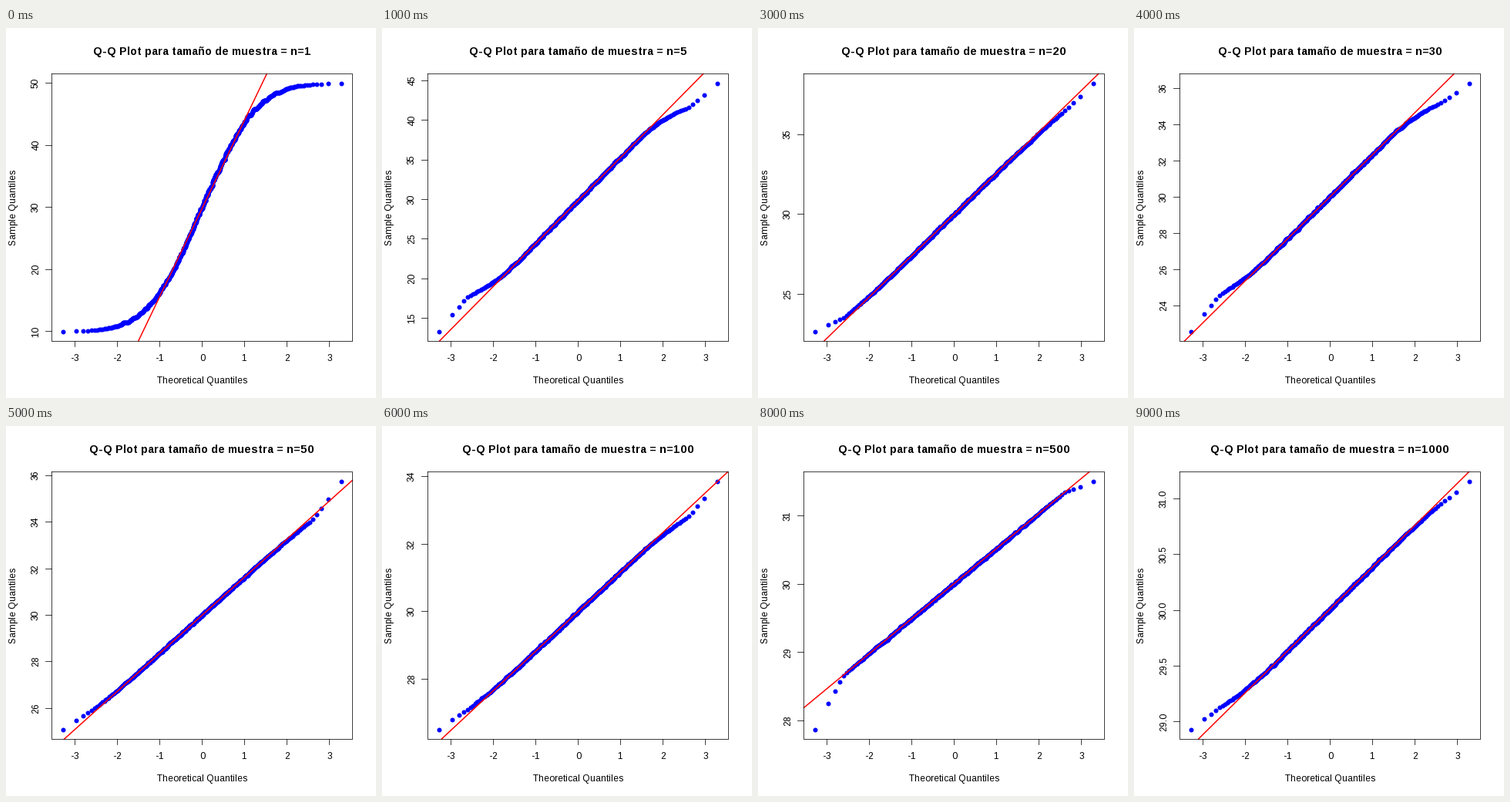
A matplotlib script that plays this animation: 480x480 px, repeating every 10 s.

```python
import math

import numpy as np
import matplotlib.pyplot as plt
from matplotlib.animation import FuncAnimation

plt.rcParams["font.family"] = "Liberation Sans"
plt.rcParams["text.hinting"] = "force_autohint"
plt.rcParams["text.hinting_factor"] = 1     # whole-pixel letter advances

SIZE, DPI = 480, 72
LEFT, RIGHT, TOP, BOTTOM = 59.04, 449.76, 59.04, 406.56
MARGIN = 0.04                               # free space beyond the data
COUNT = 1000

# Theoretical quantiles: the inverse of the normal distribution
grid = np.linspace(-4, 4, 4001)
cdf = [0.5 * (1 + math.erf(g / math.sqrt(2))) for g in grid]
prob = (np.arange(COUNT) + 0.5) / COUNT
quant = np.interp(prob, cdf, grid)
Q_MAX = quant[-1] * (1 + 2 * MARGIN)

# Sample size, smallest and largest mean, centre and slope of the line,
# and how far each tail leaves the line (in slopes)
PLOTS = [
    (1, 10, 50, 29.85, 14.22, 0, 0),
    (5, 13.33, 44.67, 29.87, 5.424, 0.37, -0.44),
    (10, 20.49, 40.63, 29.92, 3.596, 0.16, 0),
    (20, 22.67, 38.2, 30, 2.584, 0.1, -0.1),
    (30, 22.57, 36.26, 30.01, 2.319, 0.27, -0.38),
    (50, 25.1, 35.74, 30, 1.632, 0.1, -0.1),
    (100, 26.51, 33.854, 30, 1.171, 0.13, -0.21),
    (200, 27.5, 32.79, 30, 0.816, 0.1, -0.1),
    (500, 27.868, 31.51, 30.01, 0.514, 0, 0),
    (1000, 28.933, 31.156, 30.013, 0.375, 0.25, -0.1),
]


def jitter(seed):
    rng = np.random.default_rng(seed)
    noise = np.convolve(rng.normal(0, 1, COUNT), np.ones(9) / 3, "same")
    rank = np.arange(COUNT)
    return noise * np.clip(np.minimum(rank, COUNT - 1 - rank) / 40, 0, 1)


def tail(size, end):
    """Distance from the line: quadratic bend, then straight to the extreme."""
    q = np.abs(quant)
    bend = size * np.clip((q - 1.3) / 1.3, 0, 1) ** 2
    reach = np.clip((q - 2.6) / (quant[-1] - 2.6), 0, 1)
    return bend + (end - size) * reach


def sample(n, lo, hi, centre, slope, low, high):
    if n == 1:
        values = lo + (hi - lo) * prob
    else:
        end_low = (lo - centre) / slope - quant[0]
        end_high = (hi - centre) / slope - quant[-1]
        off = np.where(quant < 0, tail(low, end_low), tail(high, end_high))
        values = centre + slope * (quant + off)
    values = np.maximum.accumulate(values + 0.01 * slope * jitter(n))
    return np.clip(values, lo, hi)


def tick_step(span):
    """Round step of 1, 2, 5 or 10 that gives about five intervals."""
    cell = span / 5
    base = 10 ** math.floor(math.log10(cell))
    step = base
    for factor, bias in ((2, 0.8), (5, 1.7), (10, 0.8)):
        if factor * base - cell < bias * (cell - step):
            step = factor * base
    return step


def to_x(q):
    return LEFT + (RIGHT - LEFT) * (q + Q_MAX) / (2 * Q_MAX)


fig = plt.figure(figsize=(SIZE / DPI, SIZE / DPI), dpi=DPI, facecolor="white")
ax = fig.add_axes([0, 0, 1, 1])
samples = [sample(*plot) for plot in PLOTS]


def stroke(xs, ys):
    ax.plot(np.floor(xs), np.floor(ys), color="black", lw=0.75, snap=True,
            solid_capstyle="projecting")


def label(x, y, text, turn=0, **kw):
    ax.text(x, y, text, rotation=turn, rotation_mode="anchor", ha="center",
            va="baseline", **{"fontsize": 12, "color": "black", **kw})


def draw(i):
    n, lo, hi, centre, slope = PLOTS[i][:5]
    pad = MARGIN * (hi - lo)
    bottom, top = lo - pad, hi + pad

    def to_y(v):
        return BOTTOM + (TOP - BOTTOM) * (v - bottom) / (top - bottom)

    ax.cla()
    ax.axis("off")
    ax.set_xlim(0, SIZE)
    ax.set_ylim(SIZE, 0)

    ax.scatter(to_x(quant), to_y(samples[i]), s=6 ** 2, color="blue", lw=0)
    ends = (np.array([bottom, top]) - centre) / slope
    ends = np.clip(ends, -Q_MAX, Q_MAX)
    ax.plot(to_x(ends), to_y(centre + slope * ends), color="red", lw=1.5,
            solid_capstyle="butt")

    stroke([LEFT, RIGHT, RIGHT, LEFT, LEFT], [TOP, TOP, BOTTOM, BOTTOM, TOP])
    for q in range(-3, 4):
        x = to_x(q)
        stroke([x, x], [BOTTOM, BOTTOM + 7.2])
        label(x, 432, str(q))

    step = tick_step(top - bottom)
    digits = 1 if step < 1 else 0
    for k in range(math.ceil(bottom / step), math.floor(top / step) + 1):
        y = to_y(k * step)
        stroke([LEFT - 7.2, LEFT], [y, y])
        label(42, y, f"{k * step:.{digits}f}", 90)

    mid_x, mid_y = (LEFT + RIGHT) / 2, (TOP + BOTTOM) / 2
    label(mid_x, 461, "Theoretical Quantiles")
    label(13.5, mid_y, "Sample Quantiles", 90)
    label(mid_x, 35, f"Q-Q Plot para tamaño de muestra = n={n}",
          fontsize=14.4, fontweight="bold")
    return []


anim = FuncAnimation(fig, draw, frames=len(PLOTS), interval=1000,
                     init_func=lambda: draw(0), repeat=True, repeat_delay=0)
plt.show()
```
